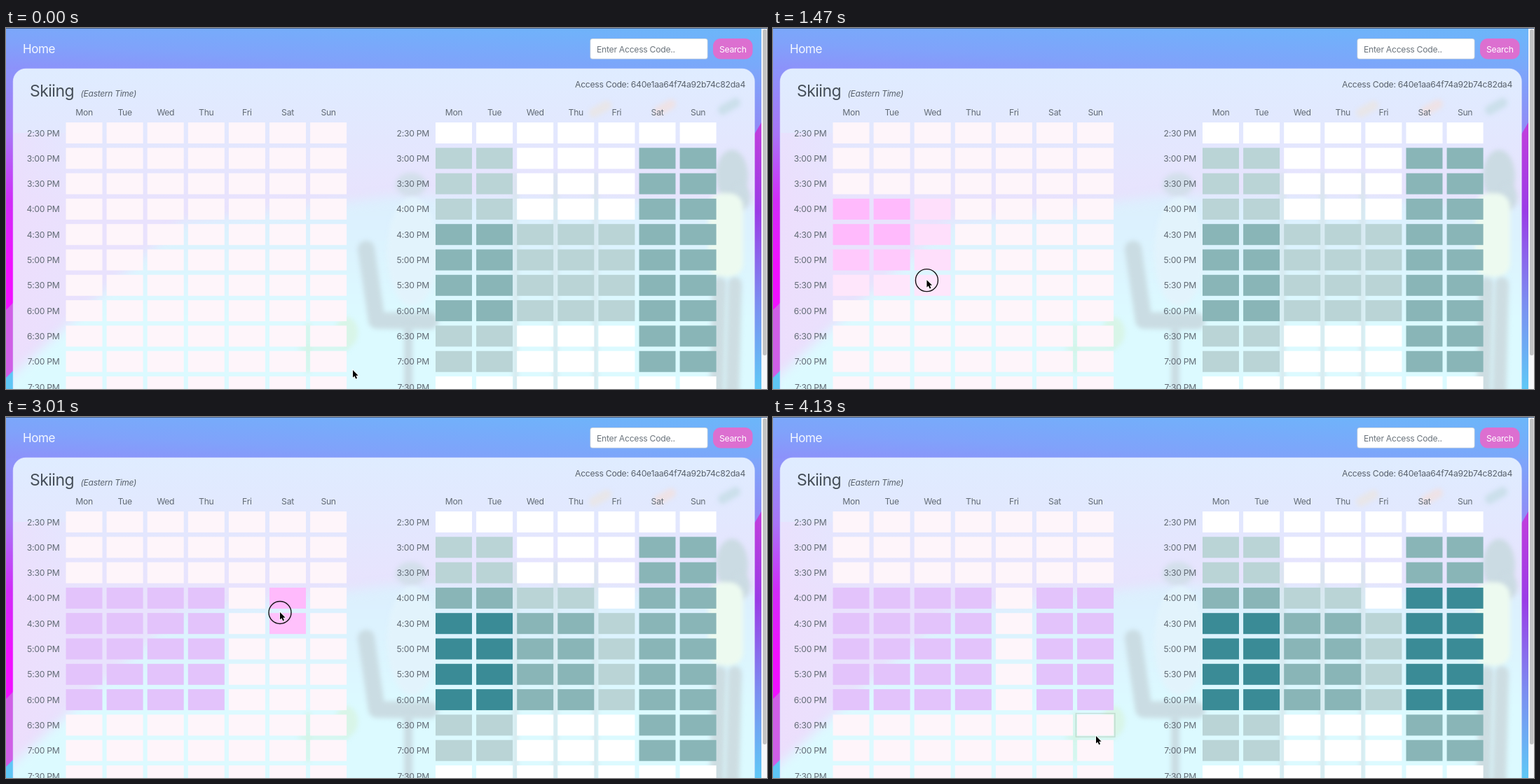
An HTML page with a canvas that plays this animation: 1086x516 px, repeating every 4.2 s.

```html
<!DOCTYPE html>
<html lang="en">
<head>
<meta charset="utf-8">
<title>Availability planner</title>
<style>
html, body { margin: 0; width: 100%; height: 100%; overflow: hidden; }
canvas { display: block; }
</style>
</head>
<body>
<canvas id="stage" width="1086" height="516"></canvas>
<script>
const W = 1086, H = 516, LOOP = 4200;
const ctx = document.getElementById('stage').getContext('2d');
const base = document.createElement('canvas');
base.width = W;
base.height = H;

const DAYS = ['Mon', 'Tue', 'Wed', 'Thu', 'Fri', 'Sat', 'Sun'];
const ROWS = 11, LEFT = 85.5, RIGHT = 613, TOP = 135;
const PITCH_X = 58.1, PITCH_Y = 36.3, CELL_W = 52, CELL_H = 30, EDGE = 2;
const EMPTY = [254, 245, 250], DRAG = [255, 186, 252], SAVED = [227, 195, 251];
const SHADES = ['#fff', '#bad4d6', '#89b5b7', '#3a8b96'];
const FADE = 120;
const INK = '#626b75', SIZE = 12.2;

const START = { x: 495, y: 489 };
const MOVES = [
  { from: 30, to: 1050, x: 111, y: 251 },
  { from: 1190, to: 1620, x: 261, y: 402 },
  { from: 1750, to: 1890, x: 263, y: 405 },
  { from: 2100, to: 2740, x: 391, y: 255 },
  { from: 2800, to: 2930, x: 391, y: 279 },
  { from: 3010, to: 3388, x: 459, y: 407 },
  { from: 3850, to: 4120, x: 461, y: 456 }
];
const DRAGS = [
  { start: 1180, end: 2010, col: 0, row: 3 },
  { start: 2790, end: 3840, col: 5, row: 3 }
];

const between = (v, a, b) => v >= Math.min(a, b) && v <= Math.max(a, b);
const colAt = x => Math.floor((x + EDGE - LEFT) / PITCH_X);
const rowAt = y => Math.floor((y + EDGE - TOP) / PITCH_Y);

function pointer(t) {
  let { x, y } = START;
  for (const m of MOVES) {
    const u = Math.min(1, Math.max(0, (t - m.from) / (m.to - m.from)));
    const ease = u * u * (3 - 2 * u);
    x += (m.x - x) * ease;
    y += (m.y - y) * ease;
  }
  return { x, y };
}

function cellState(c, r, t) {
  for (const d of DRAGS) {
    if (t < d.start) continue;
    const { x, y } = pointer(Math.min(t, d.end));
    if (between(c, d.col, colAt(x)) && between(r, d.row, rowAt(y)))
      return t < d.end ? DRAG : SAVED;
  }
  return EMPTY;
}

// Averaging the recent states gives a linear colour fade
function cellColor(c, r, t) {
  const n = 8, sum = [0, 0, 0];
  for (let k = 0; k < n; k++)
    cellState(c, r, t - k * FADE / n).forEach((v, i) => sum[i] += v / n);
  return `rgb(${sum.map(Math.round)})`;
}

function groupCount(c, r) {
  if (r < 1 || r > 9) return 0;
  if (c > 4) return 2;
  const core = r > 3 && r < 8;
  return c < 2 ? 1 + core : +core;
}

// Evenly spaced colour stops
function gradient(g, x0, y0, x1, y1, ...colors) {
  const fill = g.createLinearGradient(x0, y0, x1, y1);
  colors.forEach((color, i) => fill.addColorStop(i / (colors.length - 1), color));
  return fill;
}

function poly(g, color, ...pts) {
  g.fillStyle = color;
  g.beginPath();
  for (let i = 0; i < pts.length; i += 2) g.lineTo(pts[i], pts[i + 1]);
  g.fill();
}

function line(g, color, width, ...pts) {
  g.strokeStyle = color;
  g.lineWidth = width;
  g.lineCap = g.lineJoin = 'round';
  g.beginPath();
  for (let i = 0; i < pts.length; i += 2) g.lineTo(pts[i], pts[i + 1]);
  g.stroke();
}

function box(g, color, x, y, w, h, r) {
  g.fillStyle = color;
  g.beginPath();
  g.roundRect(x, y, w, h, r);
  g.fill();
}

function blob(g, color, x, y, rx, ry) {
  g.fillStyle = color;
  g.beginPath();
  g.ellipse(x, y, rx, ry, 0, 0, 7);
  g.fill();
}

function text(g, str, x, y, color = INK, align = 'left', size = SIZE, style = '') {
  g.font = `${style} ${size}px Inter, "Liberation Sans", sans-serif`;
  g.letterSpacing = -size * 0.023 + 'px';
  g.textAlign = align;
  g.fillStyle = color;
  g.fillText(str, x, y);
}

function drawBackdrop(g) {
  g.fillStyle = gradient(g, 1086, -40, 1076, 140, '#62c0f8', '#70b2fa', '#80a2fa', '#9488fa');
  g.fillRect(0, 0, W, H);

  g.fillStyle = gradient(g, 0, 59, 0, 340, '#8c94fa', '#a874f6', '#d02cf8', '#f010ff');
  g.fillRect(0, 59, 40, H);
  for (const [y, color] of [[403, '#cf5fe6'], [500, '#5fc6f5']])
    poly(g, color, 0, y, 40, y - 40, 40, H, 0, H);

  g.fillStyle = gradient(g, 0, 59, 0, 140, '#7da6fa', '#8f8cf6');
  g.fillRect(1050, 59, 36, 120);
  poly(g, gradient(g, 0, 135, 0, H, '#c23fdc', '#9a3ce6', '#7c8cf0', '#5fc8f6'),
    1050, 182, 1078, 135, 1078, H, 1050, H);
}

function drawIllustration(g) {
  g.filter = 'blur(8px)';
  poly(g, gradient(g, 0, 240, 0, 420, '#dceefd', '#dcfaff'),
    0, 505, 250, 278, 560, 238, W, 250, W, 540, 0, 540);
  g.filter = 'blur(3px)';
  const gray = '#cadce3';

  // Floating papers
  ['#e8e6e9', '#eee2e6', '#cbdfeb'].forEach((color, i) => {
    const x = 848 + i * 92, y = 115 - i * 2;
    line(g, color, 14, x - 9, y + 6, x + 9, y - 4);
  });

  // Seated figure and chair
  blob(g, '#d3dfeb', 578, 224, 22, 17);
  blob(g, '#e2f3fc', 580, 320, 36, 78);
  line(g, gray, 24, 514, 316, 529, 418, 605, 419);
  line(g, gray, 12, 574, 430, 574, 530);

  // Desk supports
  for (let i = 0; i < 3; i++) line(g, '#d5e4e9', 6, 727 + i * 57, 210, 727 + i * 57, H);

  // Standing figure
  blob(g, '#cbdbe3', 1036, 212, 23, 38);
  blob(g, '#cbdbe3', 1049, 242, 13, 18);
  box(g, '#edfaf0', 1002, 236, 50, 120, 20);
  for (const x of [1018, 1040]) line(g, '#cddde2', 20, x, 366, x - 4, 530);

  // Plant
  blob(g, '#d8f5e8', 486, 435, 16, 22);
  line(g, '#d2f4e4', 6, 431, 425, 431, 490);
  line(g, '#d2f4e4', 5, 420, 458, 486, 458);
  g.filter = 'none';
}

function drawCard(g) {
  g.save();
  g.beginPath();
  g.roundRect(10.5, 58.5, 1057.5, 500, 18);
  g.fillStyle = gradient(g, 0, 59, 0, 260, '#dfecff', '#e3e7fe', '#e9e2fd');
  g.fill();
  g.clip();
  g.fillStyle = gradient(g, 11, 0, 110, 0, 'rgba(240,218,252,.5)', 'rgba(240,218,252,0)');
  g.fillRect(11, 150, 100, 350);
  drawIllustration(g);
  g.strokeStyle = 'rgba(232,240,255,.7)';
  g.lineWidth = 2;
  g.stroke(new Path2D());
  g.restore();
  g.strokeStyle = 'rgba(232,240,255,.7)';
  g.lineWidth = 1.5;
  g.beginPath();
  g.roundRect(10.5, 58.5, 1057.5, 500, 18);
  g.stroke();

  text(g, 'Skiing', 34, 98, '#454e58', 'left', 23);
  text(g, '(Eastern Time)', 106.5, 97.5, '#59626c', 'left', 12, 'italic');
  text(g, 'Access Code: 640e1aa64f74a92b74c82da4', 1055, 85, '#59626c', 'right');

  for (const x of [LEFT, RIGHT]) {
    DAYS.forEach((day, c) => text(g, day, x + c * PITCH_X + CELL_W / 2, 125, INK, 'center'));
    for (let r = 0; r < ROWS; r++) {
      const half = 5 + r;
      const label = `${half >> 1}:${half % 2 ? '30' : '00'} PM`;
      text(g, label, x - 9, 154.5 + r * PITCH_Y, INK, 'right');
    }
  }
}

function drawPage(g) {
  drawBackdrop(g);
  drawCard(g);

  text(g, 'Home', 24, 36, '#f4f8ff', 'left', 17);
  box(g, '#ced4da', 833.5, 15, 168, 29.5, 3.5);
  box(g, '#fff', 834.3, 15.8, 166.4, 27.9, 3);
  text(g, 'Enter Access Code..', 843, 34.5, '#6c757d');
  box(g, '#dc6fd0', 1009, 15, 56.5, 29.5, 11);
  text(g, 'Search', 1037.3, 34.5, '#fff', 'center');

  // Scrollbar and window edge
  g.fillStyle = '#f6f7f9';
  g.fillRect(1078, 0, 8, H);
  box(g, '#c1c2c4', 1080, 2, 5.5, 466, 2.7);
  g.fillStyle = '#47628c';
  g.fillRect(0, 0, W, 1);
}

function drawPointer(x, y, pressed) {
  if (pressed) {
    ctx.strokeStyle = '#111';
    ctx.lineWidth = 1.4;
    ctx.beginPath();
    ctx.arc(x, y + .5, 16, 0, 7);
    ctx.stroke();
  }
  const arrow = new Path2D('M0 0V10.5L2.4 8.4 4.2 12.4 6 11.6 4.3 7.7H7.6Z');
  ctx.save();
  ctx.translate(x, y);
  ctx.strokeStyle = 'rgba(255,255,255,.9)';
  ctx.lineWidth = 1.6;
  ctx.stroke(arrow);
  ctx.fillStyle = '#000';
  ctx.fill(arrow);
  ctx.restore();
}

function draw(t) {
  ctx.drawImage(base, 0, 0);
  const { x, y } = pointer(t);
  const pressed = DRAGS.some(d => t >= d.start && t < d.end);

  for (let r = 0; r < ROWS; r++) {
    for (let c = 0; c < DAYS.length; c++) {
      const dx = c * PITCH_X, cy = TOP + r * PITCH_Y;
      const state = cellState(c, r, t);
      ctx.fillStyle = cellColor(c, r, t);
      ctx.fillRect(LEFT + dx, cy, CELL_W, CELL_H);
      ctx.fillStyle = SHADES[groupCount(c, r) + (state === SAVED)];
      ctx.fillRect(RIGHT + dx, cy, CELL_W, CELL_H);

      if (!pressed && state === EMPTY && c === colAt(x) && r === rowAt(y)) {
        ctx.strokeStyle = 'rgba(165,185,170,.45)';
        ctx.lineWidth = 1.3;
        ctx.strokeRect(LEFT + dx - 1.8, cy - 1.8, CELL_W + 3.6, CELL_H + 3.6);
      }
    }
  }
  drawPointer(x, y, pressed);
}

drawPage(base.getContext('2d'));
const began = performance.now();
function tick() {
  draw((performance.now() - began) % LOOP);
  requestAnimationFrame(tick);
}
tick();
</script>
</body>
</html>
```
